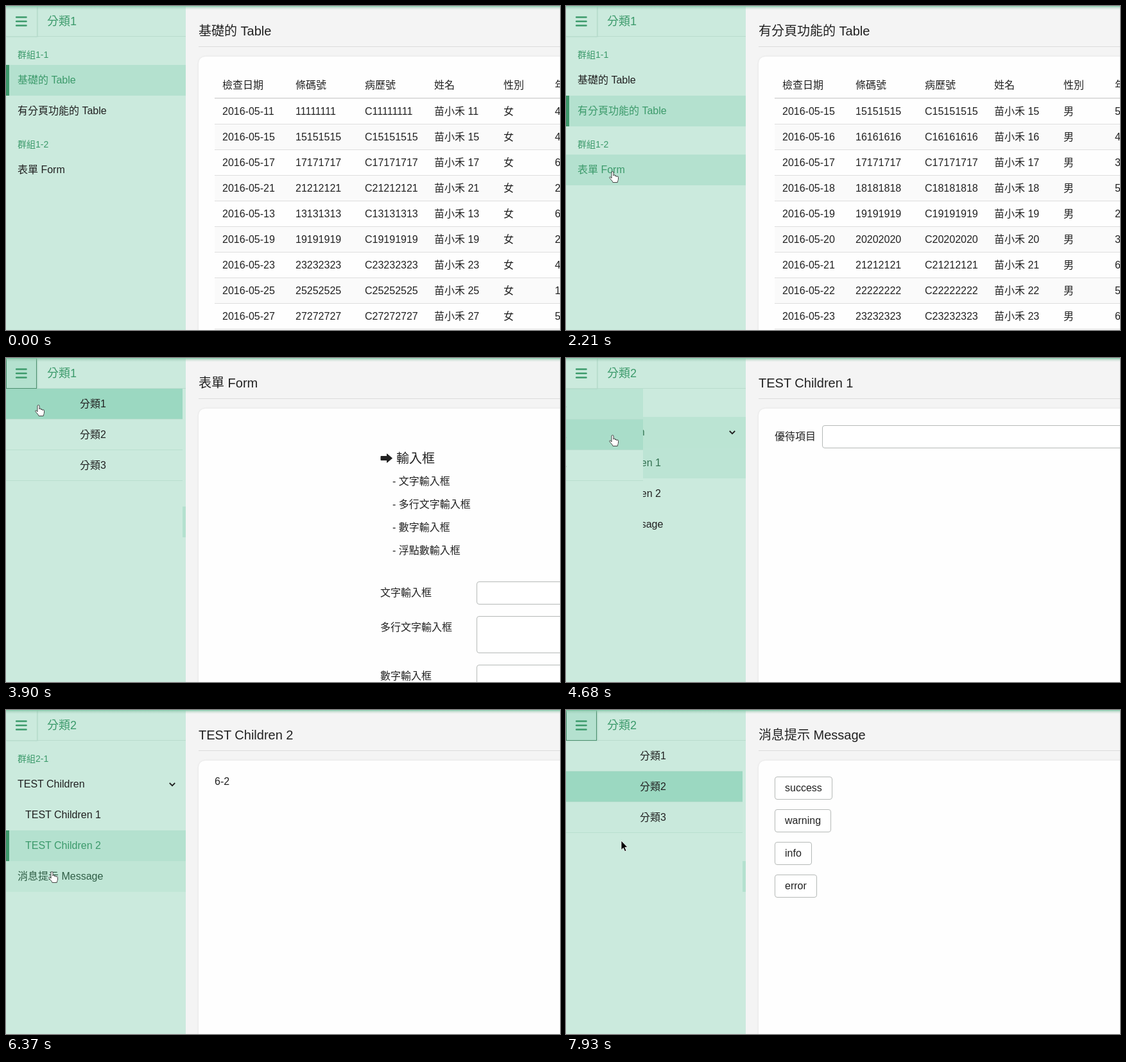
Write an HTML page that moves like this. It is 863 px wide and 506 px high and loops after 8000 ms.

```html
<!DOCTYPE html>
<html lang="zh-Hant">
<head>
<meta charset="utf-8">
<title>Menu demo</title>
<style>
  * { box-sizing: border-box; }
  html, body { margin: 0; width: 100%; height: 100%; overflow: hidden; }
  body { position: relative; background: #f4f4f4; color: #212121;
    font: 16px "Liberation Sans", "Noto Sans CJK TC", "Noto Sans CJK", sans-serif; }
  div, svg { position: absolute; }
  .label { line-height: 24px; white-space: pre; }
  .layer { inset: 0; }
  .rule { left: 300px; right: 0; top: 63px; height: 1px; background: #dcdcdc; }
  .card { left: 300px; top: 79px; right: -20px; bottom: -20px; background: #fefefe;
    border-radius: 10px; box-shadow: 0 0 3px rgba(0, 0, 0, .1); }
  .box { border: 1px solid #b5b9b7; border-radius: 4px; background: #fff; }
  .button { left: 325px; height: 36px; padding: 0 15px; line-height: 34px; }
  .sidebar { left: 0; top: 0; width: 280px; bottom: 0; background: #cbeadd; overflow: hidden; }
  .green { color: #3c9a6b; }
  .item { left: 0; width: 280px; height: 48px; }
  .bar { left: 0; top: 0; width: 5px; height: 48px; background: #3f996c; }
  .panel { left: 0; top: 48px; width: 275px; bottom: 0; background: #cbeadd; }
  .choice { left: 0; width: 275px; height: 48px; border-bottom: 1px solid #b9dfcf; }
  .head { left: 0; top: 0; width: 280px; height: 48px; background: #cbeadd; border-bottom: 1px solid #b9dccd; }
  .burger { left: 0; top: 0; width: 48px; height: 48px; box-shadow: 1px 0 2px #a9d2c0; }
  .burger.open { background: #b4e1cf; border: 1px solid #4b8f6e; }
  .glow { left: 0; right: 0; top: 0; height: 6px;
    background: linear-gradient(#84cdab, rgba(140, 190, 165, .35) 45%, transparent); }
</style>
</head>
<body>
<script>
const LOOP = 8000, STEP = 130, FADE = 200, SLIDE = 240;
const BASE = '#cbeadd', HOVER = '#b4e1cf', CHOSEN = '#9bd8c1', INK = '#212121', GREEN = '#3c9a6b';

function add(parent, className, style = {}, text = '') {
  const el = document.createElement('div');
  el.className = className;
  el.textContent = text;
  for (const key in style) {
    const value = style[key];
    el.style[key] = typeof value === 'number' && key !== 'fontWeight' ? value + 'px' : value;
  }
  parent.append(el);
  return el;
}
const label = (parent, x, middle, text, style = {}, className = '') =>
  add(parent, 'label ' + className, { left: x, top: middle - 12, ...style }, text);
function addSvg(parent, x, y, width, height, shapes) {
  parent.insertAdjacentHTML('beforeend',
    `<svg style="left:${x}px;top:${y}px;overflow:visible" width="${width}" height="${height}">${shapes}</svg>`);
  return parent.lastElementChild;
}

// Content pages
function makePage(title) {
  const page = add(document.body, 'layer');
  label(page, 300, 39, title, { fontSize: 20, fontWeight: 500 });
  add(page, 'rule');
  add(page, 'card');
  return page;
}
const field = (page, x, y, height) => add(page, 'box', { left: x, top: y, right: -20, height });

function tablePage(title, days, sex, ages) {
  const page = makePage(title), columns = [337, 451, 559, 667, 775, 855];
  ['檢查日期', '條碼號', '病歷號', '姓名', '性別', '年齡'].forEach((text, i) =>
    label(page, columns[i], 124, text, { fontWeight: 500 }));
  add(page, '', { left: 325, right: 0, top: 143, height: 2, background: '#dedede' });
  days.forEach((day, i) => {
    const code = String(day).repeat(4);
    add(page, '', { left: 325, right: 0, top: 145 + 40 * i, height: 40,
      background: i % 2 ? '#fafafa' : 'none', borderBottom: '1px solid #dedede' });
    [`2016-05-${day}`, code, 'C' + code, `苗小禾 ${day}`, sex, ages[i] + '0'].forEach((text, c) =>
      label(page, columns[c], 164.5 + 40 * i, text));
  });
  return page;
}

function formPage() {
  const page = makePage('表單 Form');
  addSvg(page, 583, 149, 20, 15, `<path d="M1 4.5H10.5V.8L18.5 7.5L10.5 14.2V10.5H1z"
    fill="${INK}" stroke="${INK}" stroke-linejoin="round"/>`);
  label(page, 608, 157, '輸入框', { fontSize: 20 });
  ['文字', '多行文字', '數字', '浮點數'].forEach((kind, i) =>
    label(page, 602, 193 + 36 * i, `- ${kind}輸入框`));
  [['文字', 367, 349, 36], ['多行文字', 421, 403, 58], ['數字', 497, 479, 36]].forEach(([kind, middle, y, height]) => {
    label(page, 583, middle, kind + '輸入框');
    field(page, 733, y, height);
  });
  return page;
}

function childPage() {
  const page = makePage('TEST Children 1');
  label(page, 325, 123, '優待項目');
  field(page, 399, 105, 36);
  return page;
}

function secondChildPage() {
  const page = makePage('TEST Children 2');
  label(page, 325, 112, '6-2');
  return page;
}

function messagePage() {
  const page = makePage('消息提示 Message');
  ['success', 'warning', 'info', 'error'].forEach((text, i) =>
    add(page, 'box button', { top: 104 + 51 * i }, text));
  return page;
}

const pages = [
  tablePage('基礎的 Table', [11, 15, 17, 21, 13, 19, 23, 25, 27], '女', '446262415'),
  tablePage('有分頁功能的 Table', [15, 16, 17, 18, 19, 20, 21, 22, 23], '男', '543523656'),
  formPage(), childPage(), secondChildPage(), messagePage()
];

// Sidebar
const sidebar = add(document.body, 'sidebar');
const menus = [add(sidebar, 'layer'), add(sidebar, 'layer')];
const group = (menu, middle, text) =>
  label(menus[menu], 18, middle, text, { fontSize: 14, fontWeight: 500 }, 'green');
group(0, 76, '群組1-1');
group(0, 216, '群組1-2');
group(1, 76, '群組2-1');

function makeItem(menu, page, y, x, text) {
  const el = add(menus[menu], 'item', { top: y });
  const bar = add(el, 'bar');
  label(el, x, 24, text);
  return { menu, page, y, el, bar };
}
const items = [
  makeItem(0, 0, 92, 18, '基礎的 Table'),
  makeItem(0, 1, 140, 18, '有分頁功能的 Table'),
  makeItem(0, 2, 232, 18, '表單 Form'),
  makeItem(1, -1, 92, 18, 'TEST Children'),
  makeItem(1, 3, 140, 30, 'TEST Children 1'),
  makeItem(1, 4, 188, 30, 'TEST Children 2'),
  makeItem(1, 5, 236, 18, '消息提示 Message')
];
addSvg(menus[1], 254, 113, 10, 7, `<path d="M.8 1L5 5.2L9.2 1" fill="none" stroke="${INK}" stroke-width="1.8"/>`);

const panel = add(sidebar, 'panel');
const choices = ['分類1', '分類2', '分類3'].map((text, i) => {
  const el = add(panel, 'choice', { top: 48 * i });
  label(el, 115, 24, text);
  return { el, y: 48 + 48 * i };
});

const head = add(sidebar, 'head');
const burger = add(head, 'burger');
addSvg(head, 15, 16, 18, 16, `<path d="M1.2 1.5H16.5M1.2 8H16.5M1.2 14.5H16.5"
  stroke="${GREEN}" stroke-width="2.6" stroke-linecap="round"/>`);
const category = label(head, 64, 24, '', { fontSize: 18 }, 'green');
add(document.body, 'glow');

const arrow = addSvg(document.body, 0, 0, 12, 18,
  '<path d="M0 0V14.5L3.3 11.5L5.6 16.8L8 15.7L5.7 10.6H10z" fill="#000" stroke="#fff" stroke-width=".8"/>');
const hand = addSvg(document.body, -5, 0, 16, 19,
  `<path d="M4 11V2a1.5 1.5 0 0 1 3 0V7a1.3 1.3 0 0 1 2.6 0V8a1.3 1.3 0 0 1 2.5 .2V9a1.2 1.2 0 0 1 2.4 .3V12
  c0 2-1 3-1.3 5.5H6C5.5 15 2.5 13 1 10.6C.2 9.2 1.8 8.3 2.8 9.4z" fill="#fff" stroke="#444"/>`);

// Timeline
const shownAt = [0, 1040, 2340, 4550, 5720, 6630];
const activeAt = [-999, 1140, 2440, 4550, 5720, 6630, Infinity];
const chosenAt = [-999, 4550, Infinity, Infinity];
const OPEN = 3380, CLOSE = 4550, REOPEN = 7540;
const pointerPath = [ // time, x, y of the pointer tip
  [260, 100, -25], [780, 91, 166], [1300, 91, 166], [1950, 72, 258], [2600, 72, 258],
  [3120, 34, 42], [3250, 28, 26], [3640, 28, 26], [4160, 72, 120], [4940, 72, 120],
  [5460, 72, 203], [6110, 72, 203], [6370, 71, 252], [6760, 71, 252], [7280, 26, 24],
  [7540, 26, 24], [7800, 86, 204]
];

const clamp = u => Math.min(1, Math.max(0, u));
const smooth = u => { u = clamp(u); return u * u * (3 - 2 * u); };
const mix = (a, b, u) => `color-mix(in srgb, ${b} ${clamp(u) * 100}%, ${a})`;
const isOpen = t => (t >= OPEN && t < CLOSE) || t >= REOPEN;
const chosen = (starts, i, t) => i < 0 ? 0 : clamp((t - starts[i]) / FADE) - clamp((t - starts[i + 1]) / FADE);

function pointer(t) {
  const next = pointerPath.findIndex(p => p[0] > t);
  if (next < 1) return pointerPath.at(next).slice(1);
  const [t0, x0, y0] = pointerPath[next - 1], [t1, x1, y1] = pointerPath[next];
  const u = smooth((t - t0) / (t1 - t0));
  return [x0 + (x1 - x0) * u, y0 + (y1 - y0) * u];
}

const targets = t => isOpen(t) ? choices : items.filter(item => item.menu === (t < CLOSE ? 0 : 1));
function targetAt(t) {
  const y = pointer(t)[1];
  return targets(t).find(row => y >= row.y && y < row.y + 48);
}

// A hover fades in and out: the share of the recent past spent over the row.
const SAMPLES = 20;
function hoverHistory(t) {
  const recent = Array.from({ length: SAMPLES }, (_, k) => targetAt(t - k * FADE / SAMPLES));
  return row => recent.filter(r => r === row).length / SAMPLES;
}

function draw(t) {
  const current = shownAt.findLastIndex(start => t >= start);
  pages.forEach((page, i) => page.style.display = i === current ? '' : 'none');

  const menu = t < CLOSE ? 0 : 1, hover = hoverHistory(t);
  menus.forEach((el, i) => el.style.display = i === menu ? '' : 'none');
  category.textContent = '分類' + (menu + 1);
  for (const item of items) {
    const active = chosen(activeAt, item.page, t), lit = Math.max(active, hover(item));
    item.el.style.background = mix(BASE, HOVER, lit);
    item.el.style.color = mix(INK, GREEN, lit);
    item.bar.style.opacity = active;
  }

  choices.forEach((choice, i) => {
    choice.el.style.background = mix(mix(BASE, HOVER, hover(choice)), CHOSEN, chosen(chosenAt, i, t));
  });
  const slide = smooth((t - OPEN) / SLIDE) - smooth((t - CLOSE) / SLIDE) + smooth((t - REOPEN) / SLIDE);
  panel.style.transform = `translateX(${Math.round((slide - 1) * 275)}px)`;
  burger.classList.toggle('open', isOpen(t));

  const [x, y] = pointer(t);
  const clickable = targetAt(t) || (x < 48 && y >= 0 && y < 48);
  hand.style.display = clickable ? '' : 'none';
  arrow.style.display = clickable ? 'none' : '';
  hand.style.transform = arrow.style.transform = `translate(${x}px, ${y}px)`;
}

function tick() {
  draw(Math.floor(performance.now() % LOOP / STEP) * STEP);
  requestAnimationFrame(tick);
}
tick();
</script>
</body>
</html>
```
